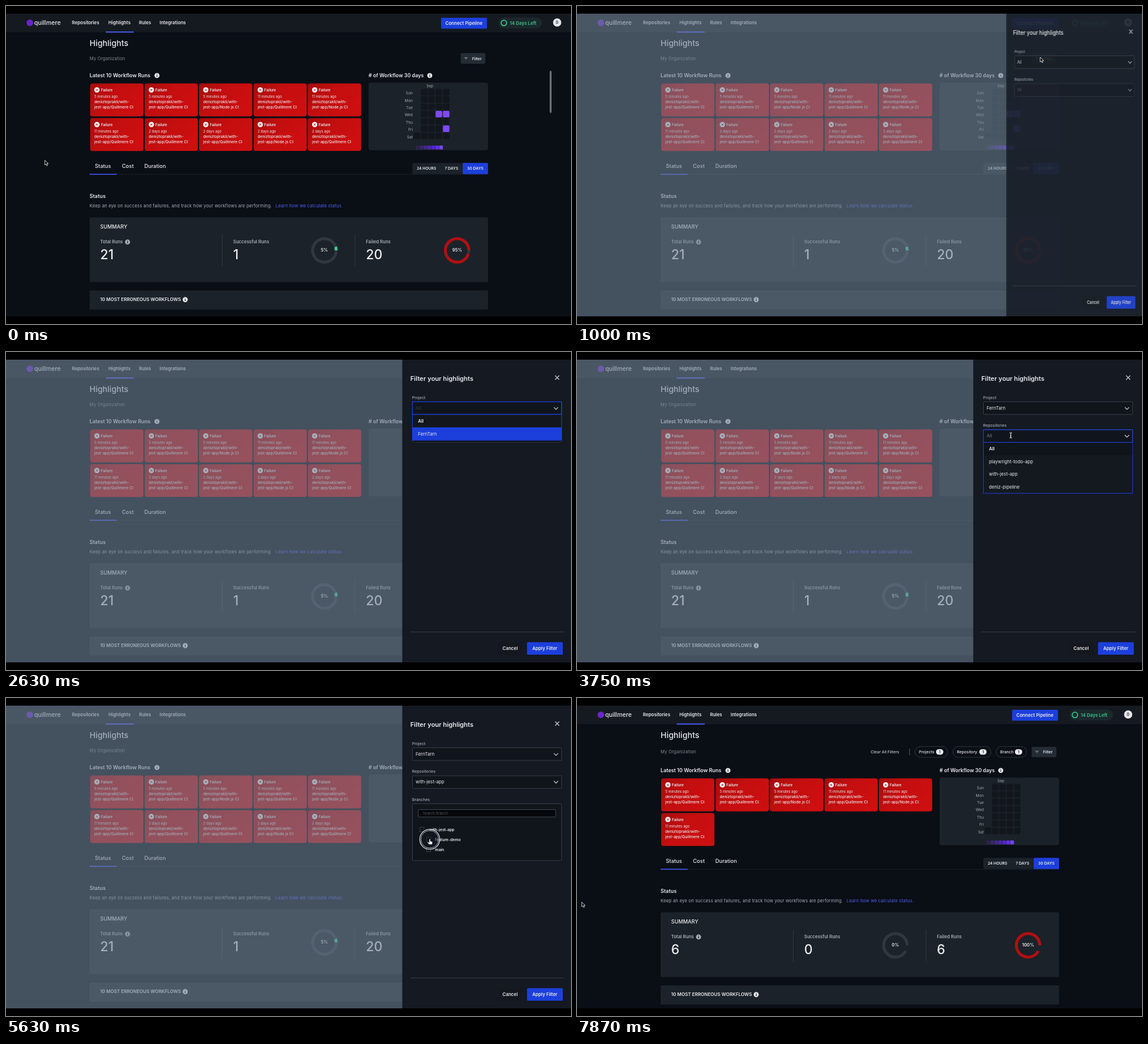
An HTML page for the animation above (8000 ms loop, 960 by 540 pixels).

```html
<!DOCTYPE html>
<html lang="en">
<head>
<meta charset="utf-8">
<title>Workflow highlights</title>
<style>
html, body { margin: 0; width: 100%; height: 100%; overflow: hidden; background: #000; }
svg { display: block; width: 960px; height: 540px; }
text { font-family: Inter, "Open Sans", sans-serif; fill: #e8eaed; white-space: pre; }
.m { font-weight: 500; } .b { font-weight: 600; } .c { text-anchor: middle; }
.s6 { font-size: 6px; } .s65 { font-size: 6.55px; } .s67 { font-size: 6.7px; }
.s77 { font-size: 7.7px; } .s9 { font-size: 9px; } .body { font-size: 7.5px; letter-spacing: .15px; }
.dim { fill: #a6adb5; } .num { font-size: 22.3px; font-weight: 500; }
.card { fill: #1b2229; } .blue { fill: #1c3fdc; }
.field { fill: #10151c; stroke: #363e49; } .focus { fill: none; stroke: #1d3fe0; stroke-width: 1.2; }
.line { fill: none; stroke: #c9cdd3; stroke-width: 1.2; }
.chip { fill: none; stroke: #363e48; stroke-width: .9; }
.box { fill: #10151c; stroke: #454d58; stroke-width: .8; }
.ring { fill: none; stroke-width: 5; }

/* One 8 s clock; the script sets its position. */
.step { animation: 8s step-end infinite paused; }
.move { animation: 8s ease-in-out infinite paused; }
.lin { animation: 8s linear infinite paused; }

.before { animation-name: before; }
.filtered { animation-name: filtered; }
.after { animation-name: after; }
.load { animation-name: load; }
.page { animation-name: page; }
#mid { animation-name: mid; }
#row { animation-name: row; }
@keyframes before { 0% { opacity: 1 } 81.2% { opacity: 0 } }
@keyframes filtered { 0% { opacity: 0 } 81.2% { opacity: 1 } }
@keyframes after { 0% { opacity: 0 } 87.5% { opacity: 1 } }
@keyframes load { 0% { opacity: 0 } 81.2% { opacity: 1 } 87.5% { opacity: 0 } }
@keyframes page {
  0% { opacity: 1; transform: translateY(0) }
  81.2% { opacity: 0; transform: translateY(0) }
  87.5% { opacity: 1; transform: translateY(5px) }
}
@keyframes mid {
  0% { transform: translateY(0) } 81.2% { transform: translateY(20.4px) } 87.5% { transform: translateY(5px) }
}
@keyframes row { 0% { transform: translateY(0) } 81.2% { transform: translateY(2.6px) } }

#scroll { animation-name: scroll; }
@keyframes scroll { 0%, 1.6% { opacity: 1 } 7%, 100% { opacity: 0 } }
.fill { transform-box: fill-box; transform-origin: 0 0; animation-name: fill; }
@keyframes fill { 0%, 81.2% { transform: scaleX(.15) } 82.8% { transform: scaleX(.3) } 87.5%, 100% { transform: scaleX(.75) } }
.sweep { animation-name: sweep; }
@keyframes sweep {
  0%, 87.5% { stroke-dasharray: 0 360; animation-timing-function: ease-out }
  98.4% { stroke-dasharray: 331 360 } 100% { stroke-dasharray: 340 360 }
}

#veil { animation-name: veil; }
@keyframes veil { 0%, 10.94% { opacity: 0 } 12.5%, 79.7% { opacity: 1 } 82.7%, 100% { opacity: 0 } }
#panel { transform-origin: 960px 0; animation-name: panel; }
@keyframes panel {
  0%, 10.94% { transform: scaleX(0); opacity: 0 }
  12.5% { transform: scaleX(.803); opacity: .83 }
  14%, 79.7% { transform: none; opacity: 1 }
  81.25% { transform: scaleX(.8); opacity: .85 }
  82.8% { transform: scaleX(.324); opacity: .42 }
  84.3%, 100% { transform: scaleX(0); opacity: 0 }
}
#all1 { animation-name: all1; }
.picked1 { animation-name: picked1; }
.open1 { animation-name: open1; }
#hover1 { animation-name: hover1; }
#repo { animation-name: repo; }
#all2 { animation-name: all2; }
.picked2 { animation-name: picked2; }
.open2 { animation-name: open2; }
#hover2 { animation-name: hover2; }
#branches { animation-name: branches; }
#checks { animation-name: checks; }
@keyframes all1 { 0% { opacity: 1 } 23.4% { opacity: .18 } 34.3% { opacity: 0 } }
@keyframes picked1 { 0% { opacity: 0 } 34.3% { opacity: 1 } }
@keyframes open1 { 0% { opacity: 0 } 23.4% { opacity: 1 } 34.3% { opacity: 0 } }
@keyframes hover1 { 0% { opacity: 0 } 28% { opacity: 1 } }
@keyframes repo { 0% { opacity: .65 } 34.3% { opacity: 1 } }
@keyframes all2 { 0% { opacity: .5 } 54.6% { opacity: 0 } }
@keyframes picked2 { 0% { opacity: 0 } 54.6% { opacity: 1 } }
@keyframes open2 { 0% { opacity: 0 } 42.1% { opacity: 1 } 54.6% { opacity: 0 } }
@keyframes hover2 {
  0% { opacity: 0; transform: translateY(0) }
  48.4% { opacity: 1; transform: translateY(0) }
  50% { opacity: 1; transform: translateY(21.5px) }
}
@keyframes branches { 0% { opacity: 0 } 57.8% { opacity: 1 } }
@keyframes checks { 0% { opacity: 0 } 71.8% { opacity: 1 } }

#pointer { animation-name: path; }
@keyframes path {
  0%, 1% { transform: translate(66px, 262px) }
  8.8%, 12.5% { transform: translate(787px, 87px) }
  18%, 23.4% { transform: translate(737px, 95px) }
  30%, 34.4% { transform: translate(722px, 139px) }
  35.8%, 46.9% { transform: translate(737px, 141.5px) }
  52%, 57% { transform: translate(725px, 206px) }
  66%, 78% { transform: translate(720px, 240px) }
  79.6%, 83% { transform: translate(908.3px, 500px) }
  87.5% { transform: translate(898px, 499px) }
  97%, 100% { transform: translate(8px, 346.5px) }
}
#arrow { animation-name: arrow; }
#beam { animation-name: beam; }
#hand { animation-name: hand; }
#click { animation-name: click; }
@keyframes arrow { 0% { opacity: 1 } 14% { opacity: 0 } 89% { opacity: 1 } }
@keyframes beam { 0% { opacity: 0 } 14% { opacity: 1 } 26% { opacity: 0 } 35.7% { opacity: 1 } 48% { opacity: 0 } }
@keyframes hand { 0% { opacity: 0 } 26% { opacity: 1 } 32% { opacity: 0 } 48% { opacity: 1 } 89% { opacity: 0 } }
@keyframes click {
  0%, 10.9%, 21.8%, 39%, 56.2%, 71.8%, 82.7% { opacity: 0; transform: scale(.6) }
  9.3%, 18.7%, 35.8%, 53%, 68.7%, 79.6% { opacity: 1; transform: scale(.6) }
  10.2%, 20.2%, 37.4%, 54.6%, 70.2%, 81.2% { opacity: 1; transform: scale(1) }
}
</style>
</head>
<body>
<svg viewBox="0 0 960 540" width="960" height="540">
<defs>
  <linearGradient id="red" x2="1" y2=".5">
    <stop stop-color="#a60c0d"/><stop offset=".45" stop-color="#c30e0f"/><stop offset="1" stop-color="#cd0f10"/>
  </linearGradient>
  <g id="info"><circle r="4.3"/><path d="M0-.6V2.3M0-2.4V-1.4" stroke="#0b0f16" stroke-width="1.2"/></g>
  <path id="chev" class="line" d="M-3.6-1.7L0 1.9L3.6-1.7"/>
</defs>

<rect y="13" width="960" height="514" fill="#0a0e15"/>
<rect y="13" width="960" height="31.5" fill="#151a21"/>
<circle cx="40.5" cy="28.5" r="5.6" fill="#6a25c9"/>
<text x="48" y="32" class="m" font-size="10.2">quillmere</text>
<g class="s77 b">
  <text x="112" y="31.4">Repositories</text><text x="174" y="31.4">Highlights</text>
  <text x="226" y="31.4">Rules</text><text x="261" y="31.4">Integrations</text>
</g>
<rect x="169.3" y="43.3" width="47.7" height="1.9" fill="#4a5cf5"/>
<rect x="739.3" y="20" width="78" height="18.4" rx="1.5" class="blue"/>
<text x="778" y="31.9" class="s77 b c">Connect Pipeline</text>
<rect x="837" y="19.5" width="73.5" height="18.5" rx="9.2" fill="#1b292c"/>
<circle cx="846" cy="28.8" r="4.6" fill="none" stroke="#38c88b" stroke-width="1.7"/>
<text x="856" y="31.6" class="s77 b" style="fill:#3cc48b">14 Days Left</text>
<circle cx="936.5" cy="28" r="7" fill="#e4e6e9"/>
<text x="936.5" y="30.2" class="s6 b c" style="fill:#20262e">D</text>

<text x="142" y="68" class="m" font-size="13.7">Highlights</text>
<g id="row" class="step">
  <text x="142" y="91.8" class="body" style="fill:#828991">My Organization</text>
  <rect x="772.5" y="80" width="42" height="18" rx="2" fill="#242c35"/>
  <path d="M778 87H785L781.5 91Z" fill="#66717c"/>
  <text x="792" y="91.5" class="s65 b">Filter</text>
  <g class="filtered step">
    <text x="499" y="91.5" class="s67 m" style="fill:#c3c8ce">Clear All Filters</text>
    <path d="M565 83.5V94.5" stroke="#59616b"/>
    <g id="chips"></g>
  </g>
</g>

<g class="page step">
  <text x="142" y="121" class="b" font-size="8.7">Latest 10 Workflow Runs</text>
  <use href="#info" x="256.5" y="118" fill="#e8eaed"/>
  <g id="runs"></g>
  <text x="616" y="121" class="b" font-size="8.6"># of Workflow 30 days</text>
  <use href="#info" x="720" y="118" fill="#e8eaed"/>
  <rect x="616" y="130" width="203" height="115" rx="4" class="card"/>
  <text x="720" y="137.6" class="c dim" font-size="6.4">Sep</text>
  <g id="heat"></g>
</g>

<g id="mid" class="step">
  <g class="s9 m">
    <text x="151" y="275.2">Status</text><text x="197" y="275.2">Cost</text><text x="235" y="275.2">Duration</text>
  </g>
  <path d="M142 286H819" stroke="#1a2028"/>
  <rect x="142" y="284.9" width="46" height="1.6" fill="#4256f2"/>
  <rect x="690.5" y="266.5" width="128.5" height="19" rx="2" class="card"/>
  <rect x="776" y="266.5" width="43" height="19" rx="1.5" class="blue"/>
  <g class="s65 b c">
    <text x="714.5" y="278.4">24 HOURS</text><text x="757" y="278.4">7 DAYS</text><text x="797.5" y="278.4">30 DAYS</text>
  </g>
  <text x="142" y="325.8" class="b" font-size="8.8">Status</text>
  <text x="142" y="342.2" class="body dim">Keep an eye on success and failures, and track how your workflows are performing.</text>
  <text x="458" y="342.2" class="body" style="fill:#4f5df2">Learn how we calculate status.</text>
</g>

<g class="page step">
  <rect x="142" y="358.7" width="677" height="110" rx="2" class="card"/>
  <text x="160" y="377.6" class="m" font-size="8.8">SUMMARY</text>
  <path d="M367.5 388V442M593 388V442" stroke="#303842"/>
  <g class="b" font-size="7.6">
    <text x="160" y="403.2" class="dim">Total Runs</text>
    <text x="386" y="403.2" class="dim">Successful Runs</text>
    <text x="611.5" y="403.2" class="dim">Failed Runs</text>
  </g>
  <use href="#info" x="206.5" y="400.7" fill="#a6adb5"/>
  <g class="before step" id="sumA"></g>
  <g class="after step" id="sumB"></g>
  <rect x="142" y="483" width="677" height="32.5" rx="2" class="card"/>
  <text x="160" y="501.2" class="b" font-size="7.75">10 MOST ERRONEOUS WORKFLOWS</text>
  <use href="#info" x="304.5" y="498.6" fill="#e8eaed"/>
</g>

<g class="load step" id="loading">
  <rect x="142" y="114" width="462.5" height="140" rx="3" class="card"/>
  <rect x="616" y="114" width="192" height="140" rx="3" class="card"/>
  <rect x="142" y="379" width="677" height="141.5" rx="3" class="card"/>
</g>
<rect id="scroll" class="lin" x="923.8" y="110" width="3.2" height="71.5" rx="1.6" fill="#6c7178"/>

<rect id="veil" class="lin" y="13" width="960" height="514" fill="#6f8295" fill-opacity=".58"/>

<g id="panel" class="lin">
  <rect x="673.3" y="13" width="286.7" height="514" fill="#141922"/>
  <text x="687" y="49.3" class="b" font-size="10.8">Filter your highlights</text>
  <path class="line" d="M933 40L940 47M940 40L933 47"/>

  <text x="690" y="80" class="s67 m dim">Project</text>
  <rect x="690.5" y="84.5" width="253.5" height="21.5" rx="1" class="field"/>
  <text x="696" y="98.2" class="s77 step" id="all1">All</text>
  <text x="696" y="98.2" class="s77 picked1 step">FernTarn</text>
  <use href="#chev" x="934.5" y="95.5"/>

  <text x="690" y="127.4" class="s67 m dim">Repositories</text>
  <g id="repo" class="step">
    <rect x="690.5" y="132" width="253.5" height="21.5" rx="1" class="field"/>
    <text x="696" y="145.4" class="s77 step" id="all2">All</text>
    <text x="696" y="145.4" class="s77 picked2 step">with-jest-app</text>
    <use href="#chev" x="934.5" y="142.7"/>
  </g>

  <g id="branches" class="step">
    <text x="690" y="174.8" class="s67 m dim">Branches</text>
    <rect x="690.5" y="179.5" width="253.5" height="96.5" rx="1" class="field"/>
    <rect x="700.5" y="189.5" width="233.5" height="12.5" rx="1" fill="#05070a" stroke="#444c56" stroke-width=".9"/>
    <text x="708" y="198" font-size="6.2" style="fill:#4d555f">Search Branch</text>
    <rect x="703" y="219.7" width="7.2" height="7.2" class="box"/>
    <rect x="714.5" y="236.8" width="7.2" height="7.2" class="box"/>
    <rect x="714.5" y="253.7" width="7.2" height="7.2" class="box"/>
    <g id="checks" class="step">
      <rect x="703" y="219.7" width="7.2" height="7.2" fill="#2444ee"/>
      <rect x="714.5" y="236.8" width="7.2" height="7.2" fill="#2444ee"/>
      <path d="M704.7 223.3L706.2 224.9L708.7 221.8M716.2 240.4L717.7 242L720.2 238.9" class="line" style="stroke-width:.9"/>
    </g>
    <g class="s65 b">
      <text x="719" y="226">with-jest-app</text><text x="729" y="242.9">feature-demo</text><text x="729" y="259.8">main</text>
    </g>
  </g>

  <g class="open1 step">
    <rect x="690.5" y="84.5" width="253.5" height="21.5" class="focus"/>
    <rect x="690.5" y="106" width="253.5" height="44" fill="#13171d" stroke="#1d3fe0"/>
    <rect id="hover1" class="blue step" x="690.5" y="128" width="253.5" height="21.7"/>
    <text x="700" y="120" class="s77 b">All</text><text x="700" y="141.5" class="s77">FernTarn</text>
  </g>
  <g class="open2 step">
    <rect x="690.5" y="132" width="253.5" height="21.5" class="focus"/>
    <rect x="690.5" y="153.5" width="253.5" height="86.5" fill="#141920" stroke="#1d3fe0"/>
    <rect x="691" y="154" width="252.5" height="21.3" fill="#10151b"/>
    <rect id="hover2" class="blue step" x="691" y="175.3" width="252.5" height="21.5"/>
    <g class="s77">
      <text x="700" y="167.3" class="b">All</text><text x="700" y="188.8">playwright-todo-app</text>
      <text x="700" y="210.3">with-jest-app</text><text x="700" y="231.8">deniz-pipeline</text>
    </g>
  </g>

  <path d="M687 475.3H949" stroke="#38404a"/>
  <rect x="836" y="493" width="40.5" height="20.5" rx="2" fill="#14181e"/>
  <text x="856.5" y="506" class="s77 b c">Cancel</text>
  <rect x="885.3" y="492.7" width="60.7" height="21.2" rx="1.5" class="blue"/>
  <text x="915.5" y="506" class="s77 b c">Apply Filter</text>
</g>

<g id="pointer" class="move">
  <g id="click" class="step">
    <circle r="17" fill="#141922" fill-opacity=".45" stroke="#f2f3f5" stroke-width="1.1"/>
    <circle r="15" fill="none" stroke="#f2f3f5" stroke-width=".7"/>
  </g>
  <path id="arrow" class="step" d="M0 0V8L1.9 6.3L3.2 9.2L4.6 8.6L3.4 5.8H6Z" fill="#000" stroke="#fff" stroke-width=".8"/>
  <path id="beam" class="step" d="M-2-4.5Q0-4.5 0-3Q0-4.5 2-4.5M0-3V3M-2 4.5Q0 4.5 0 3Q0 4.5 2 4.5M-1 .8H1" fill="none" stroke="#fff" stroke-width="1"/>
  <path id="hand" class="step" d="M-1 0Q0-1 1 0V3L4 4Q5 4.4 4.6 6L3.8 8.8H-1.3L-3.8 5.6Q-3.6 4-2.3 4.7L-1 5.6Z" fill="#fff" stroke="#10141a" stroke-width=".6"/>
</g>
<path d="M0 0H960V13H0ZM0 527H960V540H0Z"/>
</svg>
<script>
const $ = id => document.getElementById(id);
const text = (x, y, cls, s, style = "") => `<text x="${x}" y="${y}" class="${cls}" style="${style}">${s}</text>`;
const rect = (x, y, w, h, r, fill) => `<rect x="${x}" y="${y}" width="${w}" height="${h}" rx="${r}" fill="${fill}"/>`;
const range = n => [...Array(n).keys()];

function run(i) {
  const age = i < 3 ? "5 minutes" : i < 6 ? "11 minutes" : "2 days";
  const job = [2, 4, 8].includes(i) ? "Node.js" : "Quillmere";
  return `<g transform="translate(${143 + i % 5 * 92.5} ${131.5 + (i > 4 ? 58.8 : 0)})" class="${i > 5 ? "before step" : ""}">
    ${rect(0, 0, 90.5, 56, 4, "url(#red)")}
    <circle cx="11.5" cy="11" r="4.5" fill="#f4f4f5"/>
    <path d="M9.8 9.3L13.2 12.7M13.2 9.3L9.8 12.7" stroke="#b00c0d"/>
    ${text(18.2, 13.3, "b", "Failure", "font-size:6.2px")}
    ${text(7, 24.5, "s6", age + " ago")}
    ${text(7, 33.7, "s65 m", "deniztoprakli/with-")}
    ${text(7, 42.7, "s65 m", `jest-app/${job} CI`)}</g>`;
}
$("runs").innerHTML = range(10).map(run).join("");

const cell = (c, r, fill) => rect(692.7 + c * 12.4, 140.7 + r * 12.4, 11.2, 11.2, 2, fill);
const days = ["Sun", "Mon", "Tue", "Wed", "Thu", "Fri", "Sat"];
$("heat").innerHTML =
  days.map((d, r) => text(691, 150.2 + r * 12.4, "dim", d, "font-size:6.4px;text-anchor:end") +
    range(5).map(c => c || r === 6 ? cell(c, r, "#12171d") : "").join("")).join("") +
  `<g class="before step">${[[3, 3], [4, 3], [4, 5]].map(([c, r]) => cell(c, r, "#7d49f5")).join("")}</g>` +
  range(7).map(i => rect(696 + i * 6.7, 237, 6.2, 6.4, 1, `hsl(256 ${38 + i * 8}% ${22 + i * 6.5}%)`)).join("");

$("chips").innerHTML = [["Projects", 574, 56], ["Repository", 638.5, 65], ["Branch", 712, 52]].map(([s, x, w]) =>
  `<rect x="${x}" y="79.7" width="${w}" height="18.6" rx="9.3" class="chip"/>` +
  text(x + 7, 91.4, "s67 m", s) + rect(x + w - 20, 84.3, 12.5, 9.4, 4.7, "#e8eaed") +
  text(x + w - 13.7, 91.3, "s65 b c", "1", "fill:#1b2229")).join("");

const GREY = "#303740", RED = "#ae1012", GREEN = "#3fcb8c";
// Arc running counterclockwise from three o'clock, in degrees.
const arc = (x, color, from, to, cls = "") =>
  `<circle class="ring ${cls}" r="20" pathLength="360" stroke="${color}" stroke-dasharray="${to - from} 360"
    transform="translate(${x} 415) scale(1 -1) rotate(${from})"/>`;
const totals = (nums, pcts) =>
  [160, 386, 611.5].map((x, i) => text(x, 430, "num", nums[i])).join("") +
  [541, 766.5].map((x, i) => text(x, 417.3, "b c", pcts[i], "font-size:7.4px")).join("");
$("sumA").innerHTML = arc(541, GREY, 18, 360) + arc(541, GREEN, 0, 18) +
  arc(766.5, GREY, 342, 360) + arc(766.5, RED, 0, 342) + totals([21, 1, 20], ["5%", "95%"]);
$("sumB").innerHTML = arc(541, GREY, 0, 360, "sweep lin") + arc(766.5, RED, 0, 360, "sweep lin") +
  totals([6, 0, 6], ["0%", "100%"]);

$("loading").innerHTML += [[373.3, 174], [711.8, 174], [474.8, 438.5]].map(([x, y]) =>
  `<circle cx="${x}" cy="${y}" r="16" fill="#808c9b"/>` + text(x, y + 25.5, "s6 m c", "Loading...") +
  rect(x - 56.3, y + 36.5, 113, 3.6, 1.5, "#3c485a") +
  `<rect class="fill lin" x="${x - 56.3}" y="${y + 36.5}" width="113" height="3.6" rx="1.5" fill="#8c97a6"/>`).join("");

const TICK = 125, LOOP = 8000;
const anims = document.getAnimations();
const start = performance.now();
function draw() {
  const t = Math.floor((performance.now() - start + 6) / TICK) * TICK % LOOP;
  for (const a of anims) a.currentTime = t;
  requestAnimationFrame(draw);
}
draw();
</script>
</body>
</html>
```
